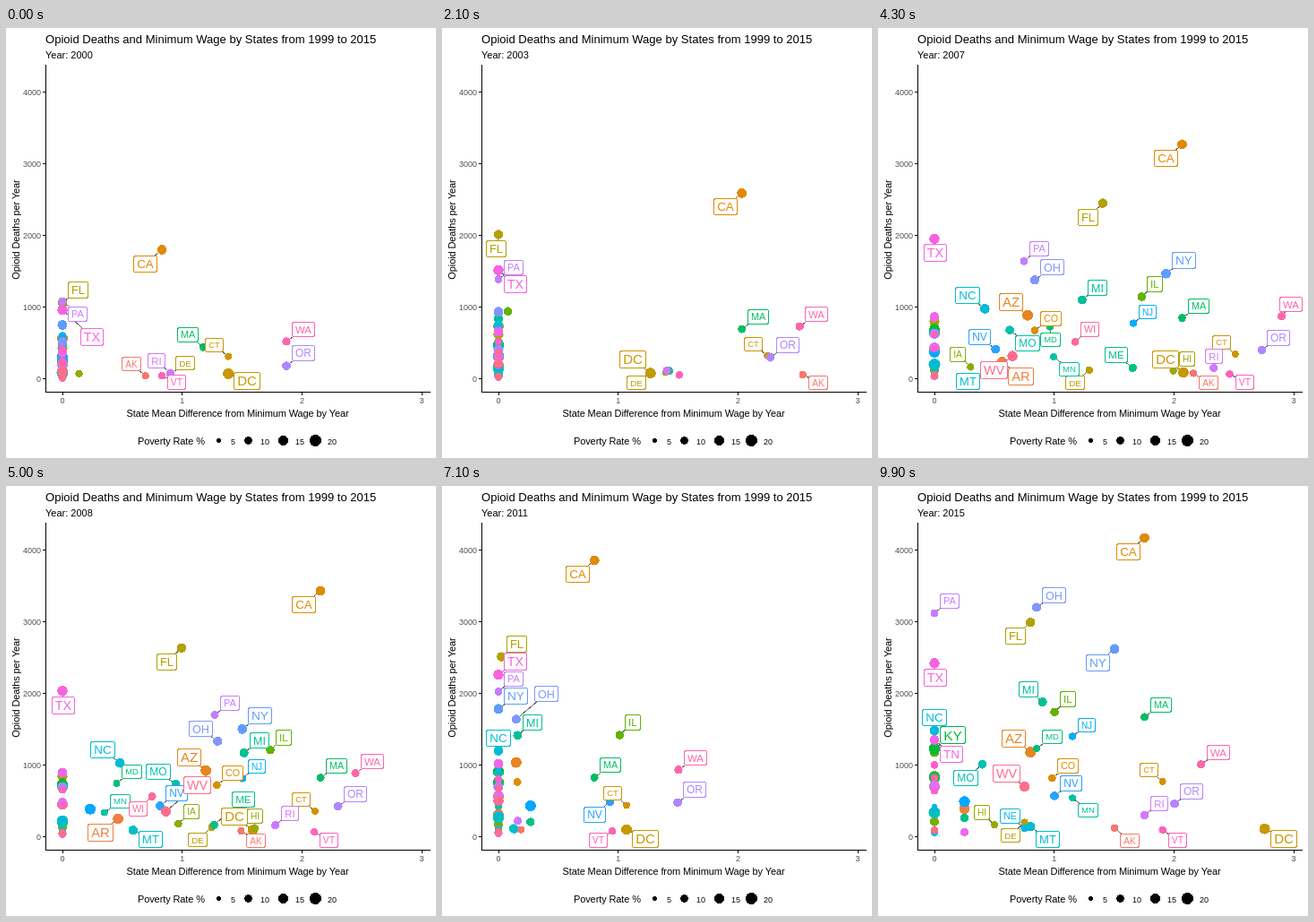
An HTML page that plays this animation: 480 by 480 pixels, repeating every 10 s.

```html
<!DOCTYPE html>
<html lang="en">
<head>
<meta charset="utf-8">
<title>Deaths and minimum wage</title>
<style>
html, body { margin: 0; width: 100%; height: 100%; overflow: hidden; background: #fff; }
svg { display: block; width: 480px; height: 480px; font-family: "Liberation Sans", Arial, sans-serif; }
circle, rect, line, path { shape-rendering: crispEdges; }
.axis { stroke: #000; fill: none; }
.tick { font-size: 9px; fill: #4d4d4d; }
.name { font-size: 11px; letter-spacing: -.11px; }
.key { font-size: 9px; }
.mid { text-anchor: middle; }
.end { text-anchor: end; }
</style>
</head>
<body>
<svg id="stage" viewBox="0 0 480 480"></svg>
<script>
const NS = 'http://www.w3.org/2000/svg';
const stage = document.getElementById('stage');

function set(el, attrs) {
  for (const k in attrs) el.setAttribute(k, attrs[k]);
}
function add(parent, tag, attrs, text) {
  const el = document.createElementNS(NS, tag);
  set(el, attrs);
  if (text !== undefined) el.textContent = text;
  return parent.appendChild(el);
}
const write = (x, y, cls, text) => add(stage, 'text', { x, y, class: cls }, text);
const clamp = (v, lo, hi) => Math.min(hi, Math.max(lo, v));

const X0 = 63, Y0 = 391.5, UNIT = 133.7, PER_DEATH = .08;
const PANEL = { left: 48.5, right: 473, top: 43, bottom: 403 };
const STEPS = 99, YEARS = 15;
const radius = size => .375 * (size + .94);

// Fixed parts
write(44, 17, '', 'Opioid Deaths and Minimum Wage by States from 1999 to 2015').setAttribute('font-size', 13.05);
const yearText = write(44, 34, '', '');
yearText.setAttribute('font-size', 11);
write(258.5, 434, 'name mid', 'State Mean Difference from Minimum Wage by Year');
write(0, 0, 'name mid', 'Opioid Deaths per Year').setAttribute('transform', 'translate(15 225) rotate(-90)');
write(147, 465, 'name', 'Poverty Rate %');

let axis = 'M44.5 41V406.5H474';
for (let i = 0; i < 5; i++) {
  const y = Y0 - 80 * i;
  axis += `M41 ${y}h3`;
  write(39, y + 3.5, 'tick end', i * 1000);
}
for (let i = 0; i < 4; i++) {
  const x = X0 + UNIT * i;
  axis += `M${Math.round(x - .5) + .5} 407v3`;
  write(x, 419, 'tick mid', i);
}
add(stage, 'path', { d: axis, class: 'axis' });
for (let i = 0; i < 4; i++) {
  const cx = 237.5 + 36 * i - (i === 1 ? 3 : 0), r = 2.4 + 4.1 * Math.pow(i / 3, .66);
  add(stage, 'circle', { cx, cy: 460.5, r });
  write(cx + 13.5, 464.5, 'key', 5 * (i + 1));
}
const lines = add(stage, 'g', { stroke: '#666' });
const dots = add(stage, 'g', {});
const tags = add(stage, 'g', {});

// Evenly spaced hues in polar LUV, chroma 100, lightness 65
function hue(deg) {
  const a = deg * Math.PI / 180, L = 65;
  const Y = ((L + 16) / 116) ** 3;
  const u = 100 * Math.cos(a) / (13 * L) + .19784, v = 100 * Math.sin(a) / (13 * L) + .46834;
  const X = 9 * Y * u / (4 * v), Z = -X / 3 - 5 * Y + 3 * Y / v;
  const rgb = [
    3.2405 * X - 1.5371 * Y - .4985 * Z,
    -.9693 * X + 1.876 * Y + .0416 * Z,
    .0556 * X - .204 * Y + 1.0572 * Z
  ].map(c => Math.round(255 * clamp(c > .00304 ? 1.055 * c ** (1 / 2.4) - .055 : 12.92 * c, 0, 1)));
  return `rgb(${rgb})`;
}

// Years count from 2000; the federal wage climbs from mid 2007 to mid 2009
const federal = y => 5.15 + .7 * clamp(y - 6.58, 0, 3);
const inflation = y => 1.385 - .039 * y + .0009 * y * y;

function lerpList(list, pos) {
  const i = clamp(Math.floor(pos), 0, list.length - 2);
  return list[i] + (list[i + 1] - list[i]) * (pos - i);
}

// points: pairs of year and wage, straight between them, none before the first
function wageAt(points, y) {
  if (!points.length || y < points[0][0]) return 0;
  const j = points.findIndex(p => p[0] >= y);
  if (j < 0) return points[points.length - 1][1];
  if (points[j][0] === y) return points[j][1];
  return lerpList([points[j - 1][1], points[j][1]], (y - points[j - 1][0]) / (points[j][0] - points[j - 1][0]));
}

const ruler = document.createElement('canvas').getContext('2d');
ruler.font = '100px "Liberation Sans", Arial, sans-serif';
const states = [];

// deaths are spread evenly over the years; side is where the label likes to sit
function state(name, size, deaths, wages = '', side = 'ne') {
  const points = wages ? wages.split(', ').map(p => p.split(' ').map(Number)) : [];
  const gaps = Array.from({ length: YEARS + 1 }, (_, y) => inflation(y) * Math.max(0, wageAt(points, y) - federal(y)));
  const w = Math.round(ruler.measureText(name).width / 100 * size + 7.2);
  const h = Math.round(.74 * size + 8);
  states.push({ name, size, deaths, gaps, side, w, h, r: radius(size) });
}

state('AK', 10, [40, 122], '0 5.65, 2 5.65, 3 7.15, 8 7.15, 14 7.75, 15 8.75', 'se');
state('AL', 15.5, [200, 700]);
state('AR', 14.8, [110, 390], '6 5.3, 7 6.25, 8 6.25, 14 7.25, 15 7.5', 'se');
state('AZ', 15, [560, 830, 1010, 1180], '7 6.75, 9 7.25, 10 7.25, 13 7.8, 15 8.05', 'nw');
state('CA', 13.4, [1800, 3040, 3800, 4170], '0 5.75, 2 6.75, 6 6.75, 8 8, 13 8, 15 9', 'sw');
state('CO', 10.8, [360, 720, 820], '7 6.85, 9 7.28, 10 7.25, 15 8.23');
state('CT', 9.5, [310, 330, 380, 770], '0 6.15, 3 6.9, 5 7.1, 10 8.25, 13 8.25, 15 9.15', 'nw');
state('DC', 15, [70, 110], '0 6.15, 4 6.15, 6 7, 8 7.3, 10 8.25, 13 8.25, 15 10', 'se');
state('DE', 9.8, [60, 200], '0 5.8, 1 6.15, 6 6.15, 8 7.15, 13 7.25, 15 8', 'sw');
state('FL', 13, [1060, 1990, 2360, 2880, 2250, 2990], '5 5.85, 6 6.4, 8 6.8, 9 7.23, 11 7.28, 12 7.67, 15 8.05', 'sw');
state('GA', 14, [420, 730, 950, 850]);
state('HI', 10.2, [70, 165], '0 5.25, 1 5.25, 3 6.25, 5 6.25, 7 7.25, 14 7.25, 15 7.75', 'nw');
state('IA', 10.3, [60, 300], '7 5.95, 8 7.25', 'nw');
state('ID', 12.5, [60, 210]);
state('IL', 11.8, [750, 1050, 1360, 1740], '4 5.5, 5 6.5, 6 6.5, 8 7.6, 11 8.25');
state('IN', 13, [250, 650, 850, 1180]);
state('KS', 12, [90, 320]);
state('KY', 15.5, [250, 600, 850, 1230]);
state('LA', 16, [300, 700, 830]);
state('MA', 10.8, [440, 680, 860, 790, 850, 1670], '0 6, 1 6.75, 6 6.75, 8 8, 14 8, 15 9');
state('MD', 9.4, [600, 740, 1230], '6 6.1, 7 6.15, 14 7.25, 15 8.1');
state('ME', 11.6, [70, 260], '2 5.75, 3 6.25, 6 6.6, 10 7.5');
state('MI', 12.5, [550, 1000, 1330, 1880], '6 5.6, 7 7.08, 9 7.4, 13 7.4, 15 8.15');
state('MN', 9.5, [130, 540], '5 5.6, 6 6.15, 12 6.15, 14 7.6, 15 8.4', 'se');
state('MO', 12, [330, 600, 860, 1010], '7 6.5, 9 7.1, 12 7.25, 15 7.65', 'sw');
state('MS', 16.5, [90, 340]);
state('MT', 13, [40, 140], '7 6.15, 10 7.25, 15 8.05', 'se');
state('NC', 13.4, [480, 900, 1150, 1480], '7 6.15, 8 6.35', 'nw');
state('ND', 10, [15, 60]);
state('NE', 10.5, [40, 120], '15 8', 'sw');
state('NH', 7, [50, 420]);
state('NJ', 10, [600, 720, 900, 1400], '5 5.4, 7 7.15, 13 7.25, 15 8.4');
state('NM', 15.5, [280, 490], '8 6.5, 9 7.5');
state('NV', 12, [290, 570], '7 6.3, 9 7.2, 11 8.25');
state('NY', 13.7, [750, 900, 1450, 1550, 1950, 2620], '5 6, 6 6.75, 7 7.15, 13 7.25, 15 8.75', 'sw');
state('OH', 12.6, [520, 900, 1400, 1270, 1900, 3200], '7 6.85, 9 7.3, 11 7.4, 15 8.1');
state('OK', 14, [200, 690, 700]);
state('OR', 12, [180, 365, 480, 460], '0 6.5, 2 6.5, 3 6.9, 8 7.95, 9 8.4, 15 9.25');
state('PA', 11, [1080, 1560, 1830, 3120], '7 6.7, 8 7.15');
state('RI', 11.3, [80, 160, 300], '0 5.8, 1 6.15, 3 6.15, 4 6.75, 7 7.4, 12 7.4, 15 9');
state('SC', 14, [220, 720]);
state('SD', 11.5, [15, 65], '15 7.5', 'se');
state('TN', 13.5, [370, 820, 960, 1350], '', 'n');
state('TX', 14.3, [960, 1830, 2230, 2420], '', 's');
state('UT', 10, [250, 640]);
state('VA', 10.5, [420, 650, 1000]);
state('VT', 10.4, [40, 95], '0 5.75, 1 6.25, 3 6.25, 4 6.75, 9 8.06, 11 8.15, 15 9.15', 'se');
state('WA', 11.4, [520, 850, 920, 1010], '0 6.5, 2 6.9, 8 8.07, 9 8.55, 11 8.67, 15 9.47');
state('WI', 10.8, [220, 560, 820], '5 5.25, 6 6.1, 7 6.5');
state('WV', 14.4, [100, 350, 700], '6 5.5, 8 6.9, 9 7.25, 14 7.25, 15 8');
state('WY', 10.5, [20, 90]);

states.forEach((s, i) => {
  const color = hue(15 + 360 * i / states.length);
  s.line = add(lines, 'line', {});
  s.dot = add(dots, 'circle', { fill: color, r: s.r });
  s.tag = add(tags, 'g', {});
  s.box = add(s.tag, 'rect', { rx: 2.5, width: s.w, height: s.h, fill: '#fff', stroke: color });
  add(s.tag, 'text', { x: s.w / 2, y: s.h / 2 + .36 * s.size, 'font-size': s.size, fill: color, class: 'mid' }, s.name);
});

// Labels try their own side first, then the others, near before far
const SIDES = { ne: [1, -1], nw: [-1, -1], sw: [-1, 1], se: [1, 1], n: [0, -1], s: [0, 1] };

function boxAt(s, side, reach) {
  const [sx, sy] = SIDES[side];
  const x = s.x + sx * (s.w / 2 + reach) - s.w / 2, y = s.y + sy * (s.h / 2 + reach) - s.h / 2;
  return {
    x: Math.round(clamp(x, PANEL.left, PANEL.right - s.w)) + .5,
    y: Math.round(clamp(y, PANEL.top, PANEL.bottom - s.h)) + .5,
    w: s.w, h: s.h
  };
}
function overlap(a, b) {
  const w = Math.min(a.x + a.w, b.x + b.w) - Math.max(a.x, b.x);
  const h = Math.min(a.y + a.h, b.y + b.h) - Math.max(a.y, b.y);
  return w > 0 && h > 0 ? w * h : 0;
}
function bestBox(s, placed, spots) {
  let best, low = Infinity;
  for (const reach of [6, 20]) {
    for (const side in SIDES) {
      const box = boxAt(s, side, reach);
      let cost = (side === s.side ? 0 : 40) + 4 * (reach - 6);
      for (const b of placed) cost += 4 * overlap(box, b);
      for (const d of spots) cost += overlap(box, d);
      if (cost < low) { low = cost; best = box; }
    }
  }
  return best;
}

function wantsLabel(s, year) {
  if (s.count > 900 + 20 * year) return true;
  const near = states.filter(o => o !== s && Math.hypot(o.x - s.x, o.y - s.y) < 16).length;
  return s.gap > .27 && near < 3;
}

function draw(step) {
  const year = step * YEARS / STEPS;
  yearText.textContent = 'Year: ' + Math.round(2000 + year);
  for (const s of states) {
    s.gap = lerpList(s.gaps, year);
    s.count = lerpList(s.deaths, year / YEARS * (s.deaths.length - 1));
    s.x = X0 + UNIT * s.gap;
    s.y = Y0 - PER_DEATH * s.count;
    set(s.dot, { cx: s.x, cy: s.y });
  }
  const spots = states.map(s => ({ x: s.x - s.r, y: s.y - s.r, w: 2 * s.r, h: 2 * s.r }));
  const placed = [];
  for (const s of states) {
    const shown = wantsLabel(s, year);
    s.tag.style.display = s.line.style.display = shown ? '' : 'none';
    if (!shown) continue;
    const box = bestBox(s, placed, spots);
    placed.push(box);
    s.tag.setAttribute('transform', `translate(${box.x} ${box.y})`);
    set(s.line, { x1: box.x + box.w / 2, y1: box.y + box.h / 2, x2: s.x, y2: s.y });
  }
}

const start = performance.now();
let drawn = -1;
function tick() {
  const step = Math.floor((performance.now() - start) % 10000 / 100);
  if (step !== drawn) draw(drawn = step);
  requestAnimationFrame(tick);
}
tick();
</script>
</body>
</html>
```
